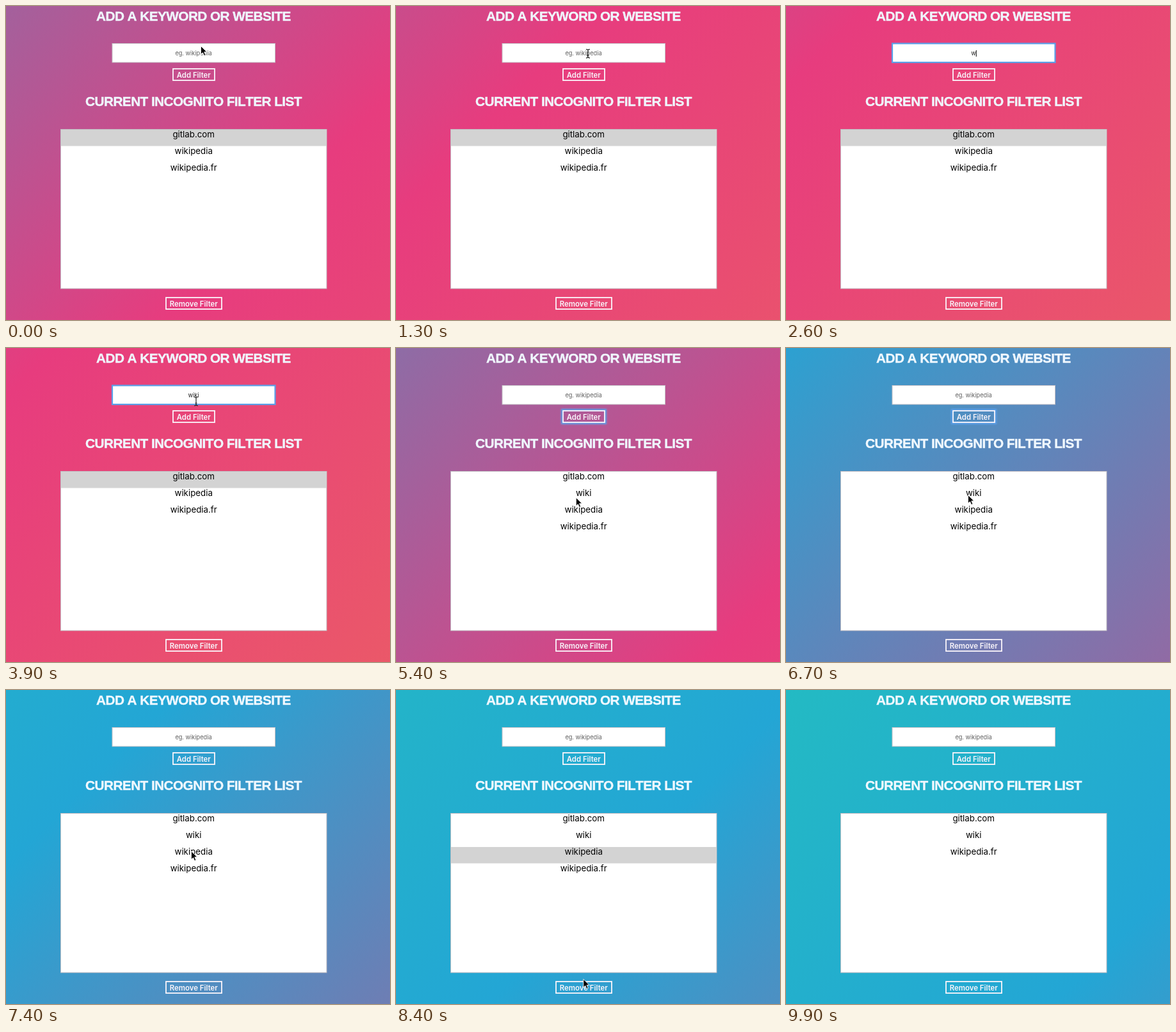
Write an HTML page that moves like this. It is 600 px wide and 490 px high and loops after 10000 ms.

```html
<!DOCTYPE html>
<html lang="en">
<head>
<meta charset="utf-8">
<title>Filter list</title>
<style>
  html, body { margin: 0; width: 100%; height: 100%; overflow: hidden; }
  svg { display: block; width: 600px; height: 490px; }
  text { text-anchor: middle; font-family: Inter, "Open Sans", sans-serif; }
  .title { font: bold 20.8px "Liberation Sans", Arial, sans-serif; font-kerning: none; letter-spacing: -.028em;
    fill: #f0f8ff; stroke: #f0f8ff; stroke-width: .4; }
  .button { font-size: 11.4px; font-weight: 600; fill: #f8f4fa; }
  .frame { fill: none; stroke: #fbf6fb; stroke-width: 1.8; }
  .entry { font-size: 13.3px; fill: #000; }
  .field { font-size: 9.2px; }
  .glow { fill: none; stroke: #5a9fe8; }
</style>
</head>
<body>
<svg viewBox="0 0 600 490">
  <defs>
    <linearGradient id="sky" gradientUnits="userSpaceOnUse">
      <stop offset="0" stop-color="#ee7752"/>
      <stop offset=".3333" stop-color="#e73c7e"/>
      <stop offset=".6667" stop-color="#23a6d5"/>
      <stop offset="1" stop-color="#23d5ab"/>
    </linearGradient>
    <filter id="soft" x="-20%" y="-40%" width="140%" height="180%"><feGaussianBlur stdDeviation="1.1"/></filter>
  </defs>
  <rect width="600" height="490" fill="url(#sky)"/>

  <text class="title" x="293" y="22.5">ADD A KEYWORD OR WEBSITE</text>
  <rect x="166" y="58.5" width="254.5" height="29.5" fill="#fff" stroke="#c4c0c6"/>
  <rect id="fieldFocus" class="glow" x="166" y="58.5" width="254.5" height="29.5" stroke-width="2.2"/>
  <text id="field" class="field" x="293" y="77.3"></text>
  <rect id="caret" y="69" width="1" height="10" fill="#000"/>

  <rect id="addFocus" class="glow" x="259.5" y="96.5" width="68" height="21" stroke-width="3.2" filter="url(#soft)"/>
  <rect class="frame" x="261" y="98" width="65" height="18"/>
  <text class="button" x="293.3" y="111.5">Add Filter</text>

  <text class="title" x="293" y="155.5">CURRENT INCOGNITO FILTER LIST</text>
  <rect x="85.5" y="192.5" width="415.5" height="248.5" fill="#fff" stroke="#c0bcc2"/>
  <rect id="highlight" x="86" y="193" width="415" height="25.5" fill="#d3d3d3"/>
  <g id="entries"></g>

  <rect class="frame" x="250" y="455" width="87" height="18"/>
  <text class="button" x="293.3" y="469">Remove Filter</text>

  <g id="pointer">
    <path id="arrow" d="M0 0V13L3 10.2 5.1 15 7.4 14 5.3 9.3H9.4Z" fill="#000" stroke="#fff" stroke-width=".9"/>
    <path id="beam" d="M-3-6.5Q0-6.5 0-4.5Q0-6.5 3-6.5M0-4.5V5M-3 7Q0 7 0 5Q0 7 3 7M-1.5 3H1.5" fill="none" stroke="#222" stroke-width="1.2"/>
  </g>
</svg>
<script>
const LOOP = 10000, STEP = 100, ROW = 26;
const TURN = 3900, SWEEP = 7500;
const FOCUS = 1500, ADD = 4900, BLUR = 7200, SELECT = 7500, REMOVE = 8800;
const KEYS = [2500, 2800, 3100, 3300];
const HOLDS = [[0, 900], [1900, 2100], [5400, 5700], [6300, 6500], [8400, 8700], [9700, 9900]];
const PATH = [[900, 304.5, 62.5], [1200, 300, 74], [2400, 297, 78], [3500, 297, 83], [4200, 297, 83],
  [4700, 295, 106], [5000, 295, 107], [5400, 281.3, 233.5], [6300, 284.5, 229.5], [6900, 284.5, 229.5],
  [7400, 289.5, 251.5], [7800, 289.5, 251.5], [8500, 293, 463], [9000, 293, 464], [9400, 300, 500]];

const $ = id => document.getElementById(id);
const set = (id, attrs) => Object.entries(attrs).forEach(([k, v]) => $(id).setAttribute(k, v));
const show = (id, on) => { $(id).style.display = on ? '' : 'none'; };

// cubic-bezier(.25, .1, .25, 1)
function ease(x) {
  const curve = (a, b, s) => 3 * a * s * (1 - s) ** 2 + 3 * b * s * s * (1 - s) + s ** 3;
  let lo = 0, hi = 1;
  for (let i = 0; i < 24; i++) {
    const mid = (lo + hi) / 2;
    if (curve(.25, .25, mid) < x) lo = mid; else hi = mid;
  }
  return curve(.1, 1, lo);
}

function pointerAt(t) {
  const i = PATH.findIndex(p => p[0] > t);
  if (i === 0) return PATH[0].slice(1);
  if (i < 0) return PATH[PATH.length - 1].slice(1);
  const [t0, x0, y0] = PATH[i - 1], [t1, x1, y1] = PATH[i];
  const u = (t - t0) / (t1 - t0), s = u * u * (3 - 2 * u);
  return [x0 + (x1 - x0) * s, y0 + (y1 - y0) * s];
}

function drawBackground(t) {
  const shift = t < TURN ? 1 - ease(1 - (TURN - t) / SWEEP) : ease((t - TURN) / SWEEP);
  const corner = .345 + .475 * shift, half = 3200;
  set('sky', { x1: corner * half, y1: corner * half, x2: (corner - 1) * half, y2: (corner - 1) * half });
}

function drawField(t) {
  const focused = t >= FOCUS && t < ADD;
  const typed = t < ADD ? 'wiki'.slice(0, KEYS.filter(k => k <= t).length) : '';
  $('field').textContent = typed || 'eg. wikipedia';
  set('field', { fill: typed ? '#222' : '#606060' });
  show('fieldFocus', focused);
  const since = t - Math.max(FOCUS, ...KEYS.filter(k => k <= t));
  show('caret', focused && Math.floor(since / 500) % 2 === 0);
  set('caret', { x: 293 + (typed ? $('field').getComputedTextLength() / 2 : 0) });
}

function drawList(t) {
  const names = ['gitlab.com', t >= ADD && 'wiki', t < REMOVE && 'wikipedia', 'wikipedia.fr'].filter(Boolean);
  $('entries').innerHTML = names.map((name, i) =>
    `<text class="entry" x="293.2" y="${204.6 + i * ROW}">${name}</text>`).join('');
  const selected = t < ADD ? 0 : t >= SELECT && t < REMOVE ? 2 : -1;
  show('highlight', selected >= 0);
  set('highlight', { y: 193 + Math.max(selected, 0) * ROW });
}

function drawPointer(t) {
  const [x, y] = pointerAt(t);
  const inField = t >= 1000 && y < 90;
  show('pointer', t < 2400 || t >= 3500);
  show('arrow', !inField);
  show('beam', inField);
  set('pointer', { transform: `translate(${x} ${y})` });
}

function render(now) {
  let t = Math.floor(now % LOOP / STEP) * STEP;
  const hold = HOLDS.find(([from, to]) => t >= from && t < to);
  if (hold) t = hold[0];
  drawBackground(t);
  drawField(t);
  drawList(t);
  drawPointer(t);
  show('addFocus', t >= ADD && t < BLUR);
}

const start = performance.now();
function tick() {
  render(performance.now() - start);
  requestAnimationFrame(tick);
}
tick();
</script>
</body>
</html>
```
